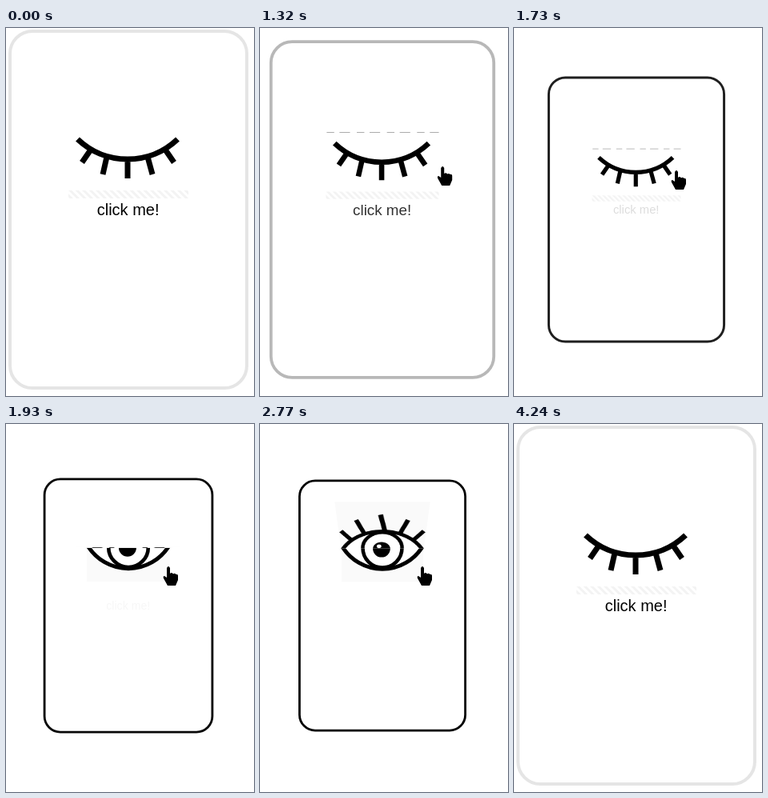
Write an HTML page that moves like this. It is 310 by 460 pixels and loops after 5380 ms.

```html
<!DOCTYPE html>
<html lang="en">
<head>
<meta charset="utf-8">
<title>Eye card</title>
<style>
  html, body { margin: 0; width: 100%; height: 100%; overflow: hidden; background: #fff; }
  svg { position: absolute; display: block; overflow: hidden; }
  #card { position: absolute; left: 3px; top: 2px; width: 300px; height: 450px; }
  #frame { position: absolute; inset: 0; box-sizing: border-box; border: 4px solid; border-radius: 30px; }
  #face { left: 0; top: 0; }
  #lid { left: 75px; top: 29.5px; transform-origin: 50% 100%; }
  #lower { left: 75px; top: 123.3px; }
  #pointer { left: 0; top: 0; }
  text { font: 20px "Liberation Sans", Arial, sans-serif; text-anchor: middle; }
</style>
</head>
<body>
<div id="card">
  <div id="frame"></div>

  <svg id="face" width="300" height="450" viewBox="-150 -225 300 450">
    <defs>
      <pattern id="hatch" width="6" height="6" patternUnits="userSpaceOnUse" patternTransform="rotate(-45)">
        <rect width="3" height="6" fill="#f3f3f3"/>
      </pattern>
      <g id="eye" fill="none" stroke="#000">
        <path d="M-70 0A84.1 84.1 0 0 1 70 0A84.1 84.1 0 0 1 -70 0Z" fill="#fff" stroke-width="7"/>
        <circle r="35" stroke-width="6.5"/>
        <circle cx="-1.5" cy="1" r="15.5" fill="#000" stroke="none"/>
        <circle cx="-6" cy="-5" r="4.2" fill="#fff" stroke="none"/>
        <path d="M-70-38L-54-19M-43-60L-31-33M-3-70L4-39M42-60L30-33M70-38L54-19" stroke-width="8"/>
      </g>
    </defs>
    <g id="closed">
      <path d="M-75-24H75V-14H-75Z" fill="url(#hatch)"/>
      <path d="M-63.5-88A90.6 90.6 0 0 0 61.5-88M-47-75L-58-59M-27-66L-32-44M-1-63V-39M24-66L30-44M46-75L57-59"
            fill="none" stroke="#000" stroke-width="7"/>
      <path id="edge" d="M-74-102.5H75" stroke="#999" stroke-width=".9" stroke-dasharray="10 7 14 9"/>
    </g>
    <text id="label" x="-.4" y="7">click me!</text>
  </svg>

  <svg id="lower" width="150" height="60" viewBox="-75 .8 150 60">
    <rect x="-73" width="146" height="61" fill="#fafafa"/>
    <use href="#eye"/>
  </svg>
  <svg id="lid" width="150" height="93" viewBox="-75 -93 150 93">
    <rect x="-74" y="-93" width="148" height="93" fill="#fafafa"/>
    <use href="#eye"/>
  </svg>
</div>

<svg id="pointer" width="310" height="460">
  <path id="arrow" d="M0 0V16L4 12.5L7 19L9.5 18L6.8 12H11.5Z"/>
  <path id="hand" d="M-2 2Q0-2 2 2V9Q4 7 6 9.5Q8 8 9.5 10Q11.5 9 12 11.5V17L9 24H-1L-6 15Q-7 12 -5 12L-2 14Z"/>
</svg>

<script>
const LOOP = 5380, ENTER = 1110, RESET = 4240, STEP = 69.5;
const HOVER = 1163, SHRINK = 1000;
const OPEN = 1900, OPENING = 2680;
const $ = id => document.getElementById(id);
const clamp = x => Math.min(1, Math.max(0, x));
const show = (id, on) => $(id).style.visibility = on ? 'visible' : 'hidden';

// cubic-bezier(.25, .1, .25, 1)
function ease(x) {
  if (x <= 0 || x >= 1) return clamp(x);
  const bezier = (s, a, b) => 3 * s * (1 - s) ** 2 * a + 3 * s * s * (1 - s) * b + s ** 3;
  let low = 0, high = 1;
  for (let i = 0; i < 24; i++) {
    const mid = (low + high) / 2;
    if (bezier(mid, .25, .25) < x) low = mid; else high = mid;
  }
  return bezier(low, .1, 1);
}

function draw(clock) {
  const active = clock >= ENTER && clock < RESET;
  // Motion advances about 14 times a second.
  const t = active ? ENTER + Math.floor((clock - ENTER + 13) / STEP) * STEP : 0;
  const hover = ease((t - HOVER) / SHRINK);
  const open = t >= OPEN;
  const angle = 90 * (1 - ease((t - OPEN) / OPENING));

  const grey = Math.round(229 * (1 - hover));
  $('card').style.transform = `scale(${1 - .3 * hover})`;
  $('frame').style.borderColor = `rgb(${grey},${grey},${grey})`;
  $('label').style.opacity = 1 - hover;
  $('lid').style.transform = `perspective(445px) rotateX(${-angle}deg)`;
  show('closed', !open);
  show('edge', !open && t > HOVER);
  show('lower', open);
  show('lid', open);

  const move = 1 - (1 - clamp((t - ENTER) / 560)) ** 3;
  const place = `translate(${305 - 102 * move} ${158 + 20 * move})`;
  for (const id of ['arrow', 'hand']) $(id).setAttribute('transform', place);
  show('arrow', active && t < HOVER);
  show('hand', active && t >= HOVER);
}

const start = performance.now();
function tick() {
  draw((performance.now() - start) % LOOP);
  requestAnimationFrame(tick);
}
tick();
</script>
</body>
</html>
```
